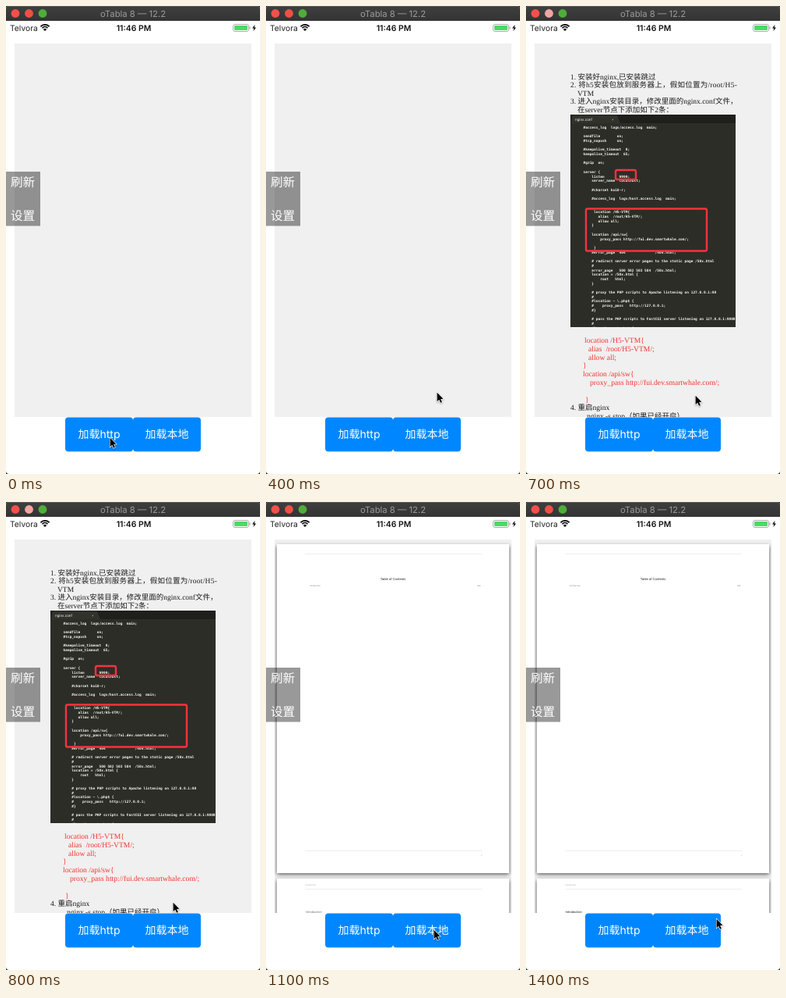
An HTML page with a canvas for the animation above (1.5 s loop, 326 by 599 pixels).

```html
<!DOCTYPE html>
<html lang="zh-CN">
<head>
<meta charset="utf-8">
<style>
  html, body { margin: 0; width: 100%; height: 100%; overflow: hidden; background: #222; }
  canvas { display: block; }
</style>
</head>
<body>
<canvas id="stage" width="326" height="599"></canvas>
<script>
const ctx = document.getElementById('stage').getContext('2d');
ctx.textRendering = 'geometricPrecision';
const SANS = 'Inter, "Noto Sans CJK SC", "Noto Sans CJK", sans-serif';
const SERIF = '"Liberation Serif", "Noto Sans CJK SC", "Noto Sans CJK", serif';
const MONO = '"DejaVu Sans Mono", monospace';
const ARIAL = '"Liberation Sans", sans-serif';
const STEP = 100, LOOP = 1500;
const GUIDE_STEP = 5, BOOK_STEP = 11;

// Pointer tip for each step
const pointer = [
  [133, 552], [133, 552], [160, 534], [204, 504], [219, 494],
  [219, 494], [219, 494], [217, 498], [214, 512], [210, 531],
  [208, 544], [215, 547], [216, 547], [232, 541], [244, 533]
];

const config = String.raw`#access_log  logs/access.log  main;

sendfile        on;
#tcp_nopush     on;

#keepalive_timeout  0;
keepalive_timeout  65;

#gzip  on;

server {
    listen       9999;
    server_name  localhost;

    #charset koi8-r;

    #access_log  logs/host.access.log  main;


     location /H5-VTM{
       alias  /root/H5-VTM/;
       allow all;
    }

    location /api/sw{
        proxy_pass http://fui.dev.smartwhale.com/;

     }
    #error_page  404              /404.html;

    # redirect server error pages to the static page /50x.html
    #
    error_page   500 502 503 504  /50x.html;
    location = /50x.html {
        root   html;
    }

    # proxy the PHP scripts to Apache listening on 127.0.0.1:80
    #
    #location ~ \.php$ {
    #    proxy_pass   http://127.0.0.1;
    #}

    # pass the PHP scripts to FastCGI server listening on 127.0.0.1:9000
    #
    #location ~ \.php$ {`.split('\n');

const steps = [
  ['1. 安装好nginx,已安装跳过', 57, 94],
  ['2. 将h5安装包放到服务器上，假如位置为/root/H5-', 57, 104.3, '0.26px'],
  ['VTM', 66, 114.7],
  ['3. 进入nginx安装目录，修改里面的nginx.conf文件，', 57, 125],
  ['在server节点下添加如下2条：', 66, 135.5],
  ['4. 重启nginx', 57, 517],
  ['nginx -s stop（如果已经开启）', 78, 527.5]
];

const snippet = [
  ['location /H5-VTM{', 75, 431], ['alias  /root/H5-VTM/;', 80, 442],
  ['allow all;', 80, 452.5], ['}', 73, 463], ['location /api/sw{', 73, 474],
  ['proxy_pass http://fui.dev.smartwhale.com/;', 82, 485], ['}', 76, 506.5]
];

function rect(x, y, w, h, color) {
  ctx.fillStyle = color;
  ctx.fillRect(x, y, w, h);
}

function round(x, y, w, h, r) {
  ctx.beginPath();
  ctx.roundRect(x, y, w, h, r);
}

function text(str, x, y, size, color, family = SANS, align = 'left', weight = 400) {
  ctx.font = `${weight} ${size}px ${family}`;
  ctx.textAlign = align;
  ctx.fillStyle = color;
  ctx.fillText(str, x, y);
}

function polygon(points, x, y) {
  ctx.beginPath();
  points.forEach(([dx, dy]) => ctx.lineTo(x + dx, y + dy));
  ctx.closePath();
}

function drawTitleBar(middle) {
  const shade = ctx.createLinearGradient(0, 0, 0, 19);
  shade.addColorStop(0, '#3f3f40');
  shade.addColorStop(1, '#343435');
  rect(0, 0, 326, 19, shade);
  rect(0, 0, 326, 1, '#59595a');
  ['#f4504a', middle, '#4eae39'].forEach((color, i) => {
    ctx.beginPath();
    ctx.arc(12 + i * 17.5, 9.5, 5.4, 0, 7);
    ctx.fillStyle = color;
    ctx.fill();
  });
  text('oTabla 8 — 12.2', 163, 13.5, 11.3, '#9b9b9b', SANS, 'center');
}

function drawStatusBar() {
  text('Telvora', 5, 32, 10.3, '#222');
  ctx.strokeStyle = '#000';
  ctx.lineWidth = 1.7;
  [7.6, 4.8].forEach(r => {
    ctx.beginPath();
    ctx.arc(50, 31.5, r, -Math.PI * 0.76, -Math.PI * 0.24);
    ctx.stroke();
  });
  ctx.beginPath();
  ctx.moveTo(50, 32);
  ctx.arc(50, 32, 3, -Math.PI * 0.76, -Math.PI * 0.24);
  ctx.fillStyle = '#000';
  ctx.fill();
  text('11:46 PM', 164, 32, 10.4, '#111', SANS, 'center', 600);

  round(291.5, 23.5, 20, 9, 2.4);
  ctx.strokeStyle = '#999';
  ctx.lineWidth = 0.8;
  ctx.stroke();
  round(293, 25, 17, 6, 1.2);
  ctx.fillStyle = '#4cd964';
  ctx.fill();
  rect(312.5, 26.5, 1, 3, '#999');
  polygon([[3.6, 0], [0, 4.8], [2.2, 4.8], [1.4, 8.5], [5, 3.6], [2.8, 3.6]], 316, 23.8);
  ctx.fillStyle = '#111';
  ctx.fill();
}

function drawGuide() {
  steps.forEach(([str, x, y, spacing = '0px']) => {
    ctx.letterSpacing = spacing;
    text(str, x, y, 9.5, '#1c1c1c', SERIF);
  });
  ctx.letterSpacing = '0px';
  snippet.forEach(([str, x, y]) => text(str, x, y, 9.6, '#f0332b', SERIF));

  ctx.save();
  ctx.beginPath();
  ctx.rect(57, 139, 212, 272);
  ctx.clip();
  rect(57, 139, 212, 272, '#2d2d28');
  rect(57, 139, 212, 11, '#1f201c');
  polygon([[0, 11], [3, 1], [60, 1], [64, 11]], 57, 139);
  ctx.fillStyle = '#31322c';
  ctx.fill();
  text('nginx.conf', 63, 146.5, 4.8, '#eee', ARIAL);
  text('×', 110, 146.5, 4.8, '#bbb', ARIAL);
  config.forEach((line, i) => text(line, 73.5, 156.8 + i * 5.71, 4.5, '#f8f8f2', MONO, 'left', 700));
  ctx.restore();

  ctx.strokeStyle = '#f5333f';
  ctx.lineWidth = 2.4;
  [[115, 210, 26, 12], [77, 259.5, 155, 54]].forEach(box => {
    round(...box, 2);
    ctx.stroke();
  });
}

function drawSheet(y, h) {
  ctx.save();
  ctx.shadowColor = 'rgba(0,0,0,.65)';
  ctx.shadowBlur = 5;
  ctx.shadowOffsetY = 1.5;
  rect(14, y, 298, h, '#fff');
  ctx.restore();
}

function drawBook(sharp) {
  drawSheet(54, 421);
  drawSheet(482, 421);
  [66, 446, 495].forEach(y => rect(50, y, 227, 0.6, '#e3e3e3'));
  text('Table of Contents', 163, 100, 4.2, '#222', ARIAL, 'center');
  text('Introduction', 56, 108.2, 2.7, '#888', ARIAL);
  text('1.1', 275, 108.2, 2.7, '#333', ARIAL, 'right');
  text('1', 276, 453, 2.5, '#999', ARIAL);
  text('Introduction', 50.5, 491.2, 2.6, '#aaa', ARIAL);
  text('Introduction', 50.5, 526.3, 4.1, sharp ? '#222' : '#777', ARIAL);
}

function drawControls() {
  rect(0, 212, 44, 69.5, 'rgba(0,0,0,.4)');
  text('刷新', 6, 231, 15.6, '#fff');
  text('设置', 6, 274, 15.6, '#fff');
  [['加载http', 76], ['加载本地', 163]].forEach(([label, x]) => {
    round(x, 526.6, 87, 43.6, 4);
    ctx.fillStyle = '#0087ff';
    ctx.fill();
    text(label, x + 43.5, 553, 14, '#fff', SANS, 'center');
  });
}

function drawPointer([x, y]) {
  polygon([[0, 0], [0, 11.4], [2.6, 9], [4.5, 13], [6.3, 12.2], [4.5, 8.3], [7.9, 8]], x + 0.6, y + 0.8);
  ctx.save();
  ctx.shadowColor = 'rgba(0,0,0,.35)';
  ctx.shadowBlur = 2;
  ctx.shadowOffsetY = 1;
  ctx.lineWidth = 1.3;
  ctx.strokeStyle = '#fff';
  ctx.stroke();
  ctx.restore();
  ctx.fillStyle = '#000';
  ctx.fill();
}

function frame(now) {
  const step = Math.floor((now % LOOP) / STEP);
  const showBook = step >= BOOK_STEP;
  const showGuide = step >= GUIDE_STEP && !showBook;
  rect(0, 0, 326, 599, '#222');
  ctx.save();
  round(0, 0, 326, 599, 4);
  ctx.clip();
  rect(0, 0, 326, 599, '#fff');
  drawTitleBar(showGuide ? '#f0a5a0' : '#ee5045');
  drawStatusBar();

  ctx.save();
  ctx.beginPath();
  ctx.rect(11, 48, 304, 478);
  ctx.clip();
  rect(11, 48, 304, 478, '#f0f0f0');
  if (showBook) drawBook(step > BOOK_STEP);
  if (showGuide) drawGuide();
  ctx.restore();

  drawControls();
  drawPointer(pointer[step]);
  ctx.restore();
  requestAnimationFrame(frame);
}
requestAnimationFrame(frame);
</script>
</body>
</html>
```
